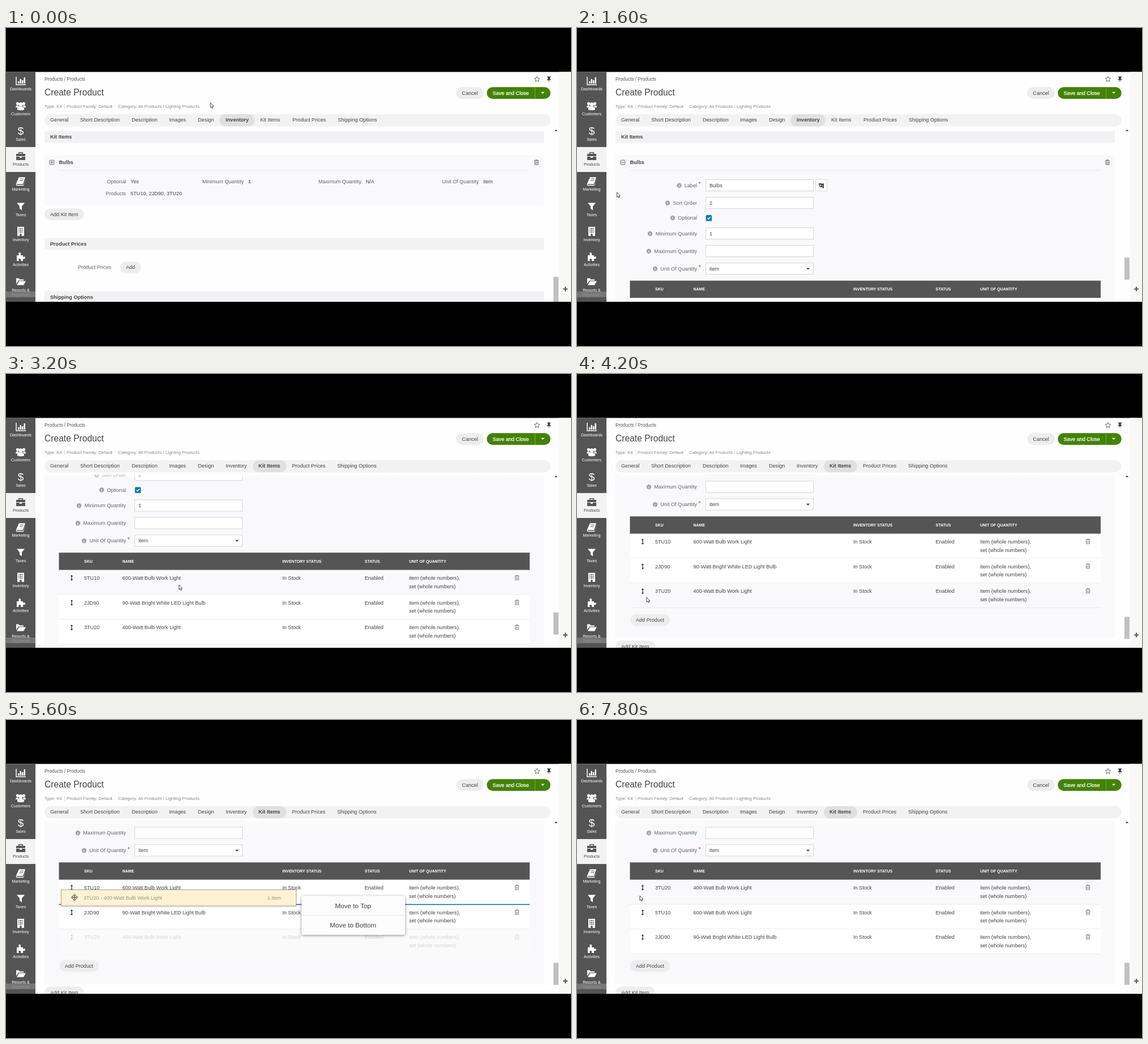
Write an HTML page that moves like this. It is 998 px wide and 561 px high and loops after 8 s.

```html
<!DOCTYPE html>
<html lang="en">
<head>
<meta charset="utf-8">
<title>Create Product</title>
<style>
html, body { margin: 0; width: 100%; height: 100%; overflow: hidden; background: #000; }
svg { display: block; width: 100%; height: 100%; }
text { font: 9.1px "Liberation Sans", Arial, sans-serif; fill: #444; white-space: pre; }
.b { font-weight: bold; }
.title { font-size: 15.6px; }
.crumb { font-size: 8.25px; fill: #555; }
.meta { font-size: 7.8px; fill: #888; }
.nav { font-size: 7.1px; fill: #fff; text-anchor: middle; }
.dark { fill: #444; }
.label { text-anchor: end; fill: #666; }
.th { font-size: 7px; font-weight: bold; fill: #fff; }
.mid { text-anchor: middle; }
.big { font-size: 11.7px; }
.save { fill: #fff; stroke: #fff; stroke-width: .25; text-anchor: middle; }
.ghost { fill: #969181; }
.red { fill: #d33; font-size: 11px; }
.info { font: bold 6.5px "Liberation Serif", serif; fill: #fff; text-anchor: middle; }
</style>
</head>
<body>
<script>
const text = (x, y, s, cls = '') => `<text x="${x}" y="${y}" dy=".31em" class="${cls}">${s}</text>`;
const rect = (x, y, w, h, fill, more = '') => `<rect x="${x}" y="${y}" width="${w}" height="${h}" fill="${fill}" ${more}/>`;
const path = (d, fill, more = '') => `<path d="${d}" fill="${fill}" ${more}/>`;
const line = (d, color, w = 1) => path(d, 'none', `stroke="${color}" stroke-width="${w}"`);
const group = (id, body, more = '') => `<g id="${id}" ${more}>${body}</g>`;
const at = (x, y, body) => `<g transform="translate(${x} ${y})">${body}</g>`;
const pill = (x, y, w, s) => rect(x, y - 10.5, w, 21, '#ededee', 'rx="10.5"') + text(x + w / 2, y, s, 'mid');
const heading = (y, s) => rect(68, y - 10.5, 882, 21, '#f2f2f4', 'rx="1"') + text(78, y, s, 'b');
const caret = (x, y, fill) => path(`M${x - 3.2} ${y - 1.8}h6.4l-3.2 3.4z`, fill);
const trash = (x, y, c) => at(x, y, line('M-4-3h8M-1.5-3v-1.2h3V-3M-3-2.5V4h6v-6.5M-1-1v3.5M1-1v3.5', c, .9));

// Sidebar
const icons = [
  line('M-8-7V7H9', '#fff', 1.5) + path('M-5 1h2.5v4H-5zM-1.5-3h2.5v8h-2.5zM2-1h2.5v6H2zM5.5-6H8V5H5.5z', '#fff'),
  `<g fill="#fff"><circle cx="-5.5" cy="-4" r="2.6"/><circle cx="5.5" cy="-4" r="2.6"/><circle cy="-2.5" r="3.6"/></g>` +
    path('M-9 3q0-4 4-4l2 4zM9 3q0-4-4-4l-2 4zM-6 7V4q1-3 3-3h6q2 0 3 3v3q-6 2-12 0z', '#fff'),
  `<text class="nav" y="6" style="font-size:19px">$</text>`,
  path('M-8-4h4v-3h8v3h4v4H-8zM-2.5-4h5v-1.5h-5zM-8 1h6v2h4V1h6v6H-8z', '#545454', 'fill-rule="evenodd"'),
  path('M-3-7H8L4 5h-10q-2 0-1 1.5H5L9-5 5 8H-7q-2-1-1-4z', '#fff') + line('M-1-4h6M-2-1h6', '#545454', 1),
  path('M-7-6H7L2 0v7l-4-3V0z', '#fff'),
  path('M-6-8H6V8H1.5V4h-3v4H-6z', '#fff') + line('M-4-5h8M-4-2h8M-4 1h8', '#545454', 1.7) + line('M-2-7V3M2-7V3', '#fff', 1.2),
  path('M-7-2h4q-2-5 1-5t2 5h4v3q4-2 4 1t-4 2v4H0q1-4-2-4T-3 8h-4z', '#fff'),
  path('M-8 4V-6h5l1 2h7v2H-4zM-3-1H9L5 6H-7z', '#fff')
];
const navNames = ['Dashboards', 'Customers', 'Sales', 'Products', 'Marketing', 'Taxes', 'Inventory', 'Activities', 'Reports &amp;'];
const sidebar = rect(0, 77, 52, 406, '#545454') + rect(0, 210, 52, 44, '#f3f3f3') +
  navNames.map((s, i) => at(26, 93 + i * 44.3, icons[i] + text(0, 15, s, 'nav' + (i == 3 ? ' dark' : '')))).join('') +
  rect(0, 465, 52, 10, '#777') + `<text x="26" y="472.5" class="nav" style="fill:#929292">Segments</text>`;

// Header
const tabNames = ['General', 'Short Description', 'Description', 'Images', 'Design', 'Inventory', 'Kit Items', 'Product Prices', 'Shipping Options'];
const tabs = (xs, active, x, w) => rect(x, 152, w, 21.5, '#e0e0e1', 'rx="10.7"') +
  tabNames.map((s, i) => text(xs[i], 162.3, s, i == active ? 'b' : '')).join('');
const header = text(68, 90.5, 'Products / Products', 'crumb') + text(68, 114, 'Create Product', 'title') +
  text(68, 139, 'Type: Kit', 'meta') + text(107, 139, 'Product Family: Default', 'meta') +
  text(198, 139, 'Category: All Products / Lighting Products', 'meta') + line('M103.5 134v9', '#ccc', .8) +
  path('M938 85.5l1.4 3 3.3.4-2.4 2.3.6 3.3-2.9-1.6-2.9 1.6.6-3.3-2.4-2.3 3.3-.4z', 'none', 'stroke="#555" stroke-width=".9"') +
  path('M956 85.5h6v1.5h-1v3l2 2h-3.5v3h-1v-3H955l2-2v-3h-1z', '#444') +
  pill(795, 114.7, 49, 'Cancel') + rect(849.3, 104.3, 112.4, 20.8, '#438206', 'rx="10.4"') +
  line('M934.5 104.3v20.8', '#76a650', 1) + text(891.5, 114.8, 'Save and Close', 'save') + caret(948, 114.5, '#fff') +
  rect(68, 152, 894, 21.5, '#f2f2f3', 'rx="10.7"') +
  group('tabInventory', tabs([78, 131, 222, 288, 339, 388, 449, 506, 586], 5, 377, 62)) +
  group('tabKit', tabs([78, 131, 222, 288, 339, 388, 446, 505, 585], 6, 436, 59));

// Kit item, collapsed
const fact = (x, y, label, value) => text(x, y, label, 'label') + text(x + 8, y, value);
const collapsed = rect(68, 224, 882, 89, '#f9f9fb') + fact(212, 271.5, 'Optional', 'Yes') +
  fact(420, 271.5, 'Minimum Quantity', '1') + fact(627.5, 271.5, 'Maximum Quantity', 'N/A') +
  fact(835, 271.5, 'Unit Of Quantity', 'item') + fact(212, 292.5, 'Products', '5TU10, 2JD90, 3TU20') +
  line('M81 234.5v5', '#555', .9);

// Kit item, expanded
const field = (y, label, iconX, value, required) =>
  `<circle cx="${iconX}" cy="${y - .3}" r="4.2" fill="#a4a4a4"/>` + text(iconX, y, 'i', 'info') + text(212, y, label, 'label') +
  (required ? text(214.5, y - 2, '*', 'red') : '') +
  (value == null ? '' : rect(227.5, y - 10.5, 190, 20, '#fff', 'stroke="#d6d6d6"') + text(234, y, value));
const form = field(278, 'Label', 180.5, 'Bulbs', true) + field(309, 'Sort Order', 160, '2') +
  field(335.3, 'Optional', 169, null) + field(363, 'Minimum Quantity', 129, '1') +
  field(394, 'Maximum Quantity', 127, '') + field(425, 'Unit Of Quantity', 138, 'item', true) +
  caret(408, 425, '#444') + rect(421.5, 267.5, 20, 20, '#fff', 'stroke="#ddd"') +
  path('M427 274h5v7l-4-1zM432 275l4-1v9l-4-2z', '#444') + line('M429 279l1-3 1 3M433.5 277v3', '#fff', .8) +
  rect(227.7, 330, 10.5, 10.5, '#0b7ba3', 'rx="1.5"') + line('M230.2 335.3l2 2 3.6-4', '#fff', 1.3);
const columns = [[138, 'SKU'], [205.5, 'NAME'], [488, 'INVENTORY STATUS'], [633.5, 'STATUS'], [712, 'UNIT OF QUANTITY']];
const products = [['5TU10', '600-Watt Bulb Work Light'], ['2JD90', '90-Watt Bright White LED Light Bulb'], ['3TU20', '400-Watt Bulb Work Light']];
const rowTop = 476.3, rowStep = 43.7;
const row = ([sku, name], i) => group('row' + i,
  rect(93.5, 0, 831.5, rowStep, '#fff') + line(`M93.5 ${rowStep - .5}h831.5`, '#ebebed') +
  line('M116 10v8', '#234', 1.2) + path('M113.8 11.5l2.2-2.8 2.2 2.8zM113.8 16.5l2.2 2.8 2.2-2.8z', '#234') +
  text(138, 14.4, sku) + text(205.5, 14.4, name) + text(488, 14.4, 'In Stock') + text(633.5, 14.4, 'Enabled') +
  text(712, 14.4, 'item (whole numbers),') + text(712, 28.9, 'set (whole numbers)') + trash(902.5, 13.5, '#777'));
const expanded = rect(68, 224, 882, 435.5, '#f9f9fb') + form +
  rect(93.5, 445.7, 831.5, 30.6, '#555') + columns.map(([x, s]) => text(x, 461.2, s, 'th')).join('') +
  products.map(row).join('') + pill(94, 628.5, 70, 'Add Product');

const itemHead = rect(77.2, 233.2, 7.6, 7.6, 'none', 'rx="1" stroke="#555" stroke-width=".9"') +
  line('M78.5 237h5', '#555', .9) + text(93.5, 237.4, 'Bulbs', 'b') + trash(937, 237, '#555') + line('M93 251.2h832', '#e9e9ec');
const below = pill(68, 328.7, 69.5, 'Add Kit Item') + heading(380.8, 'Product Prices') +
  text(186, 422.4, 'Product Prices', 'label dark') + pill(201.5, 422.5, 37, 'Add') + heading(474.8, 'Shipping Options');

// Drag layer
const drag = group('dropLine', line('M93.5 0h831.5', '#12688a', 1.6)) +
  group('helper', rect(97.5, 0, 415, 28.5, '#fdf3d3', 'opacity=".96" stroke="#a5a28f" filter="url(#soft)"') +
    text(137, 14.3, '3TU20 - 400-Watt Bulb Work Light', 'ghost') + text(461.5, 14.3, '1 item', 'ghost') +
    at(121, 13.5, line('M-4.5 0h9M0-4.5v9', '#333', 1) +
      path('M-6 0l2.6-2.4v4.8zM6 0L3.4-2.4v4.8zM0-6l-2.4 2.6h4.8zM0 6l-2.4-2.6h4.8z', '#fff', 'stroke="#333" stroke-width=".8"'))) +
  rect(522, 310.5, 183, 68.5, '#fcfcfc', 'rx="4" filter="url(#shadow)"') +
  path('M522 344.7h183', 'none', 'stroke="#ddd" stroke-dasharray="2 1"') +
  text(613, 328, 'Move to Top', 'mid big') + text(613, 362, 'Move to Bottom', 'mid big');

document.body.innerHTML = `<svg viewBox="0 0 998 561"><defs>
  <clipPath id="page">${rect(0, 77.5, 998, 405.5, '#000')}</clipPath>
  <clipPath id="view">${rect(52, 176, 925, 307, '#000')}</clipPath>
  <linearGradient id="fade" x2="0" y2="1"><stop stop-color="#fefefe"/><stop offset="1" stop-color="#fefefe" stop-opacity="0"/></linearGradient>
  <filter id="shadow" x="-10%" y="-20%" width="120%" height="140%"><feDropShadow dx="0" dy="1" stdDeviation="2.5" flood-opacity=".45"/></filter>
  <filter id="soft" x="-5%" y="-30%" width="110%" height="160%"><feDropShadow dx="0" dy="1" stdDeviation="1" flood-opacity=".2"/></filter>
  </defs>${rect(0, 0, 998, 561, '#000')}<g clip-path="url(#page)">` +
  rect(0, 77, 998, 406, '#fefefe') + rect(977, 77, 21, 406, '#f8f8f8') + line('M984 460.5h8M988 456.5v8', '#555', 2) +
  sidebar + header +
  `<g clip-path="url(#view)">` + group('scroller', heading(192.3, 'Kit Items') +
    group('collapsed', collapsed) + group('expanded', expanded) + itemHead + group('below', below)) +
  rect(68, 175, 882, 9, 'url(#fade)') + '</g>' +
  path('M968.8 182h5.4l-2.7-3z', '#444') + `<rect id="thumb" x="967" width="9" fill="#c1c1c1"/>` +
  group('drag', drag) +
  group('cursor', path('M0 0v8.3l1.9-1.7 1.3 3 1.4-.6-1.3-2.9h2.6z', '#fff', 'stroke="#222" stroke-width=".8"')) +
  '</g></svg>';

const el = id => document.getElementById(id);
const show = (id, on) => el(id).style.display = on ? '' : 'none';
const move = (id, x, y) => el(id).setAttribute('transform', `translate(${x} ${y})`);

// Linear interpolation through [time, value...] keys
function track(keys, t) {
  const i = keys.findIndex(k => k[0] > t);
  if (i < 0) return keys[keys.length - 1].slice(1);
  if (!i) return keys[0].slice(1);
  const a = keys[i - 1], b = keys[i], p = (t - a[0]) / (b[0] - a[0]);
  return a.slice(1).map((v, j) => v + (b[j + 1] - v) * p);
}
const cursorKeys = [[0, 361, 132], [200, 345, 140], [800, 100, 229], [1000, 81, 236], [1200, 81, 236], [1400, 73, 272],
  [1600, 70.5, 290], [1800, 70.5, 290], [2400, 295, 367], [2600, 305, 371], [3200, 305.5, 372], [3600, 290, 376],
  [4200, 123, 394], [4400, 117, 385], [4600, 116, 383], [6400, 116, 300], [6600, 111, 310]];
const scrollKeys = [[2200, 0], [2600, 66], [2800, 66], [3200, 130.5], [3600, 194.5]];
const helperKeys = [[4800, 372], [5000, 354], [5200, 330], [5400, 311], [5600, 299.5], [6000, 283]];

function draw(now) {
  const t = Math.floor(now % 8000 / 200) * 200;
  const open = t >= 1200, dragging = t >= 4800 && t < 6400, dropped = t >= 6400;
  const [scroll] = track(scrollKeys, t), [x, y] = track(cursorKeys, t), [helperY] = track(helperKeys, t);

  show('collapsed', !open);
  show('expanded', open);
  show('tabInventory', scroll == 0);
  show('tabKit', scroll > 0);
  move('scroller', 0, -scroll);
  move('below', 0, open ? 346.5 : 0);
  el('thumb').setAttribute('y', open ? 405 + scroll * .12 : 439);
  el('thumb').setAttribute('height', open ? 39 : 44);

  products.forEach((_, i) => {
    const top = rowTop + (dropped ? (i + 1) % 3 : i) * rowStep, dy = y + scroll - top;
    const hover = !dragging && x > 94 && dy >= 0 && dy < rowStep;
    move('row' + i, 0, top);
    el('row' + i).style.opacity = dragging && i == 2 ? .2 : 1;
    el('row' + i).firstChild.setAttribute('fill', hover ? '#f9f9fb' : '#fff');
  });

  show('drag', dragging);
  show('cursor', !dragging);
  move('helper', 0, helperY);
  const slot = helperY > 340 ? 2 : helperY > 292 ? 1 : 0;
  move('dropLine', 0, rowTop - scroll + slot * rowStep);
  move('cursor', x, y);
}
const start = performance.now();
(function loop() {
  draw(performance.now() - start);
  requestAnimationFrame(loop);
})();
</script>
</body>
</html>
```
